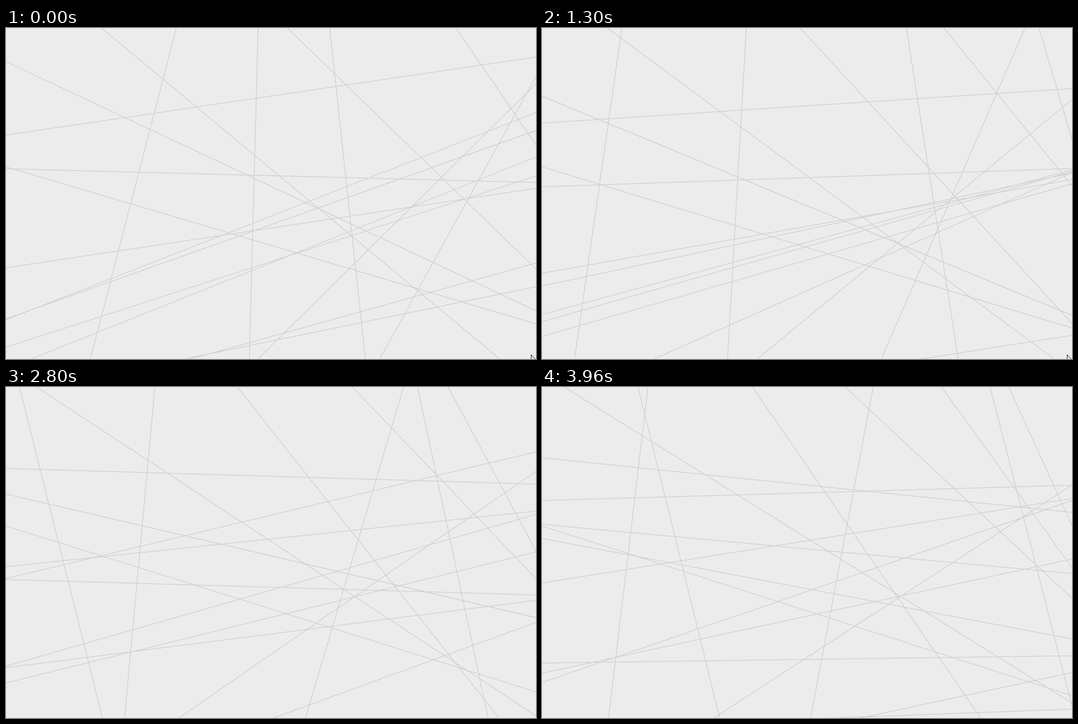
Recreate the animation shown at these times as an HTML page with a canvas. Size 947 px wide and 591 px high, loop 4060 ms.

```html
<!DOCTYPE html>
<html lang="en">
<head>
<meta charset="utf-8">
<title>Drifting lines</title>
<style>
  html, body { margin: 0; width: 947px; height: 591px; overflow: hidden; background: #ececec; }
  canvas { display: block; }
</style>
</head>
<body>
<canvas id="stage" width="947" height="591"></canvas>
<script>
const ctx = document.getElementById('stage').getContext('2d');
const LOOP = 4060, TRAVEL = 3960, STEP = 83.4;

// The lines span a box larger than the stage; their ends slide along its sides.
const LEFT = -13, TOP = -22, RIGHT = 1375, BOTTOM = 775;

// Key points per line: one end from, to; other end from, to.
// Points past a corner of the box are folded back by bounce().
const upright = [
  [310, -192, 103, -389], [451, 192, 430, 97], [576, 795, 662, 1000],
  [144, -30, 1104, 1286], [480, 361, 1303, 911], [789, 518, 1334, 1374],
  [1007, 596, 566, 445], [971, 698, 1040, 1274], [1267, 824, 1374, 1188],
  [1070, 1250, 264, -50]
];
const level = [
  [193, 125, -11, 268], [54, 244, 706, 1177], [251, 352, 287, 131],
  [244, 244, 655, 688], [430, 532, 222, 56], [686, 203, 301, -207],
  [574, 514, 126, 215], [524, 268, 31, 531], [526, 493, -16, -518],
  [614, 834, 59, -462], [659, 783, 374, 702], [730, 611, 876, 559]
];

const pointer = new Path2D('M0 0V14.5L3.3 11.5L5.5 16.3L7.7 15.3L5.6 10.5H10Z');

function bounce(v, lo, hi) {
  return v < lo ? 2 * lo - v : v > hi ? 2 * hi - v : v;
}

function slide(from, to, progress, lo, hi) {
  return bounce(from + (to - from) * progress, lo, hi);
}

// The picture advances about twelve times a second.
function stepTime(ms) {
  const step = Math.floor((ms - 34) / STEP);
  return step < 0 ? 0 : Math.min(TRAVEL, 44 + step * STEP);
}

function drawLines(progress) {
  ctx.beginPath();
  for (const [a, a2, b, b2] of upright) {
    ctx.moveTo(slide(a, a2, progress, LEFT, RIGHT), TOP);
    ctx.lineTo(slide(b, b2, progress, LEFT, RIGHT), BOTTOM);
  }
  for (const [a, a2, b, b2] of level) {
    ctx.moveTo(LEFT, slide(a, a2, progress, TOP, BOTTOM));
    ctx.lineTo(RIGHT, slide(b, b2, progress, TOP, BOTTOM));
  }
  ctx.strokeStyle = '#cfcfcf';
  ctx.lineWidth = 1.25;
  ctx.stroke();
}

function drawPointer(x, y) {
  ctx.save();
  ctx.translate(x + 0.5, y + 0.5);
  ctx.fillStyle = '#fff';
  ctx.strokeStyle = '#111';
  ctx.lineWidth = 1;
  ctx.fill(pointer);
  ctx.stroke(pointer);
  ctx.restore();
}

function draw(now) {
  const ms = stepTime(now % LOOP);
  ctx.fillStyle = '#ececec';
  ctx.fillRect(0, 0, 947, 591);
  drawLines(ms / TRAVEL);
  if (ms < 1700) drawPointer(938, 583);
  else if (ms < 1950) drawPointer(886, 569);
  requestAnimationFrame(draw);
}
requestAnimationFrame(draw);
</script>
</body>
</html>
```
